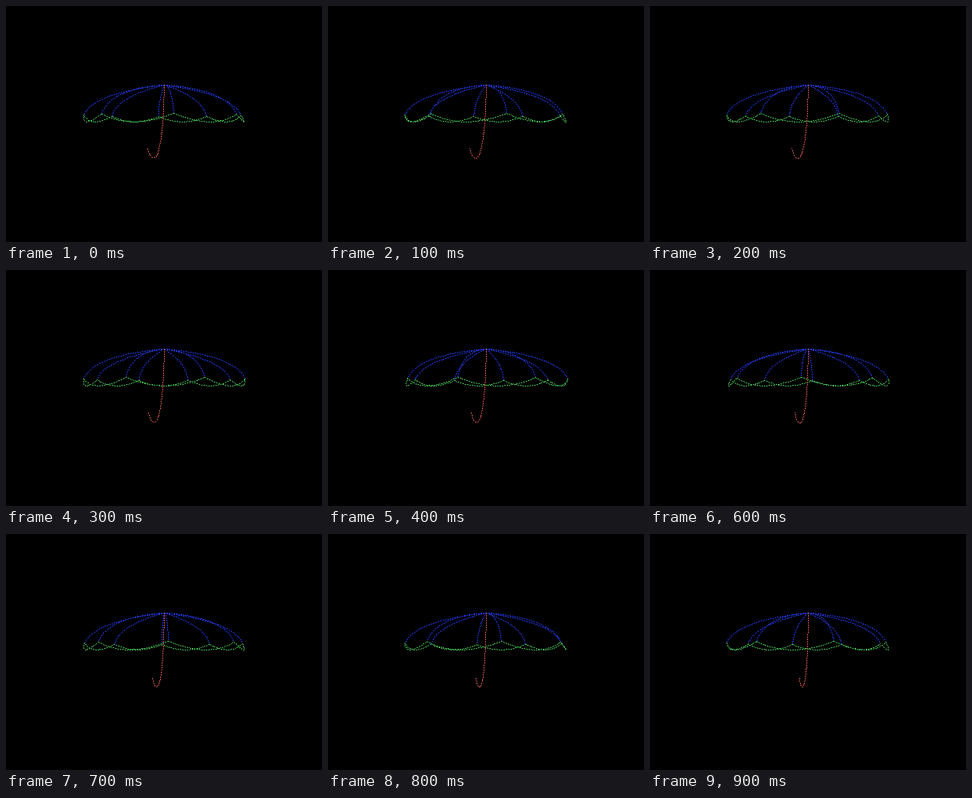
Write an HTML page with a canvas that moves like this. It is 400 px wide and 300 px high and loops after 1 s.

```html
<!DOCTYPE html>
<html lang="en">
<head>
<meta charset="utf-8">
<title>Turning umbrella</title>
<style>
html, body { margin: 0; width: 100%; height: 100%; overflow: hidden; background: #000; }
canvas { display: block; width: 100vw; height: 100vh; image-rendering: pixelated; }
</style>
</head>
<body>
<canvas id="stage" width="400" height="300"></canvas>
<script>
const ctx = document.getElementById('stage').getContext('2d');
const LOOP = 1000, STEP = 100, START = 5.2, TURN = 6;
const RIBS = 8, GAP = 360 / RIBS;
const CX = 200.3, HORIZON = 147.2, DIST = 400;
const RIM = 100, DIP = 98, TIP = 8.2, TOP = 46.8;
const BLUE = '#2038e0', GREEN = '#40b850', RED = '#d05444';

// Perspective view from the height of the rim; angle 0 faces the viewer.
function project(deg, r, z) {
  const a = deg * Math.PI / 180;
  const s = DIST / (DIST - r * Math.cos(a));
  return [CX + r * Math.sin(a) * s, HORIZON - z * s];
}

// Broken one-pixel line: two pixels drawn, one left out.
function curve(color, at, n = 16) {
  ctx.fillStyle = color;
  let [x0, y0] = at(0), count = 0;
  let px, py;
  for (let i = 1; i <= n; i++) {
    const [x1, y1] = at(i / n);
    const len = Math.max(1, Math.ceil(Math.max(Math.abs(x1 - x0), Math.abs(y1 - y0))));
    for (let j = 0; j <= len; j++) {
      const x = Math.floor(x0 + (x1 - x0) * j / len);
      const y = Math.floor(y0 + (y1 - y0) * j / len);
      if (x === px && y === py) continue;
      [px, py] = [x, y];
      if (count++ % 3 < 2) ctx.fillRect(x, y, 1, 1);
    }
    [x0, y0] = [x1, y1];
  }
}

const quad = (a, b, c, t) => (1 - t) ** 2 * a + 2 * t * (1 - t) * b + t * t * c;
const cubic = (a, b, c, d, t) => (1 - t) * quad(a, b, c, t) + t * quad(b, c, d, t);

function rib(deg) {
  curve(BLUE, t => project(deg, quad(0, 89, RIM, t), quad(TOP, 35.5, TIP, t)));
}

function scallop(deg) {
  curve(GREEN, t => {
    const q = (2 * t - 1) ** 2;
    return project(deg + GAP * t, DIP + (RIM - DIP) * q, TIP * q);
  });
}

function handle(deg) {
  curve(RED, t => project(deg, cubic(0, 0.5, 3.5, 8, t), cubic(TOP, 0, -24, -39, t)));
  curve(RED, t => project(deg, cubic(8, 10.5, 18, 21, t), cubic(-39, -48, -50, -33.5, t)));
}

function draw(now) {
  const turn = START + TURN * Math.floor(now % LOOP / STEP);
  ctx.fillStyle = '#000';
  ctx.fillRect(0, 0, 400, 300);
  for (let i = 0; i < RIBS; i++) rib(turn + i * GAP);
  for (let i = 0; i < RIBS; i++) scallop(turn + i * GAP);
  handle(turn - 90);
}

function tick() {
  draw(performance.now());
  requestAnimationFrame(tick);
}
tick();
</script>
</body>
</html>
```
